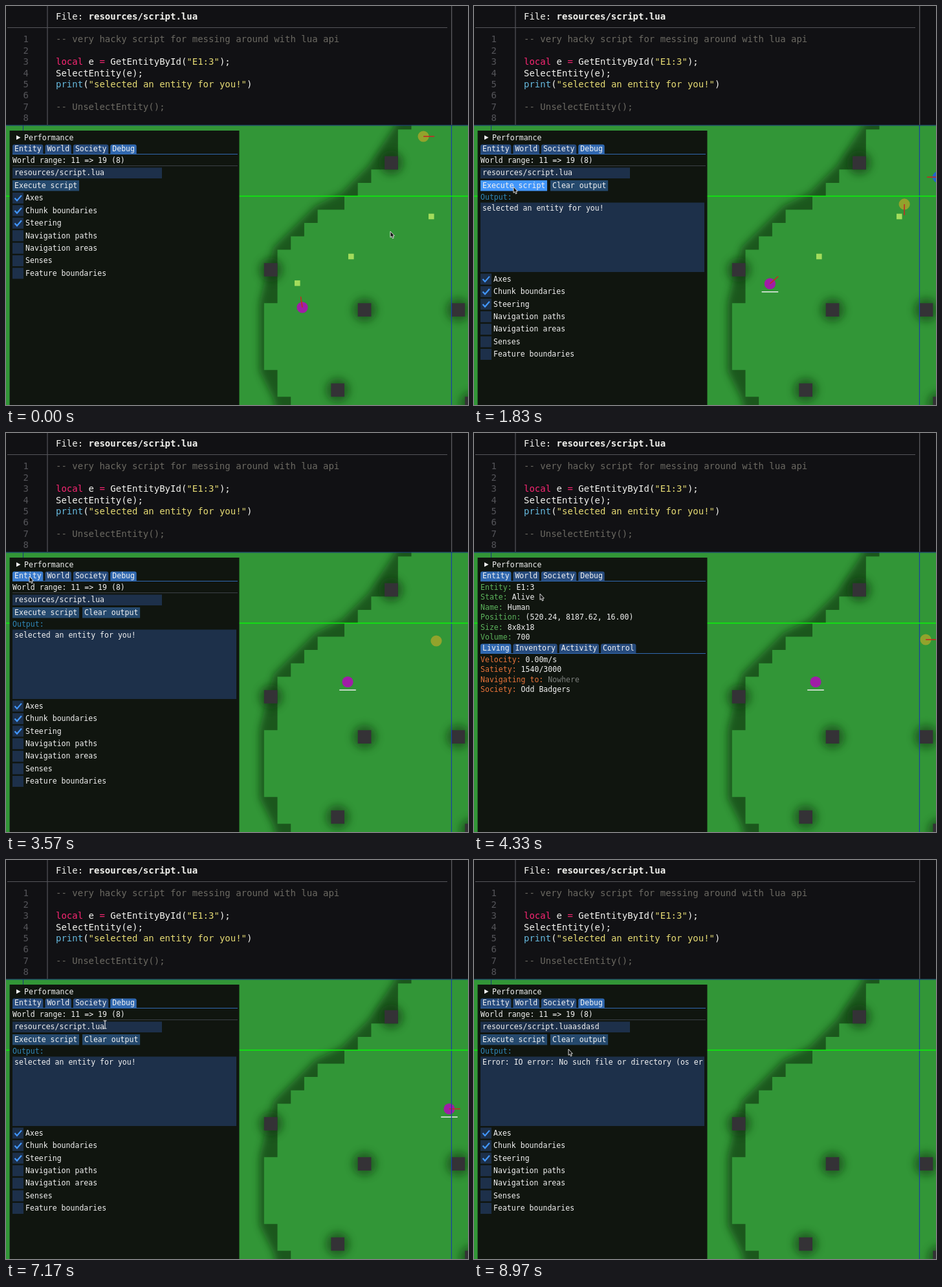
Write an HTML page that moves like this. It is 714x618 px and loops after 9010 ms.

```html
<!DOCTYPE html>
<html lang="en">
<head>
<meta charset="utf-8">
<title>Lua scripting demo</title>
<style>
  html, body { margin: 0; width: 100%; height: 100%; overflow: hidden; background: #111114; }
  svg { display: block; }
  text { white-space: pre; font-family: "DejaVu Sans Mono", monospace; }
  .code text { font-size: 14px; fill: #f4f4f0; }
  .ui text { font-size: 11.55px; fill: #f2f2f2; }
</style>
</head>
<body>
<svg width="714" height="618" viewBox="0 0 714 618">
  <defs>
    <filter id="soft" x="-60%" y="-60%" width="220%" height="220%"><feGaussianBlur stdDeviation="6"/></filter>
    <clipPath id="map"><rect y="184" width="714" height="434"/></clipPath>
    <clipPath id="outputBox"><rect x="10" y="304" width="345" height="108"/></clipPath>
  </defs>
  <g clip-path="url(#map)">
    <g id="terrain"></g>
    <g id="actors"></g>
    <g id="grid"></g>
  </g>
  <g id="editor" class="code"></g>
  <rect x="5.6" y="193" width="354.9" height="430" fill="#10150f"/>
  <g id="panel" class="ui"></g>
  <g id="pointer"></g>
</svg>
<script>
const LOOP = 9010, CHAR = 6.953, CELL = 20.7;
const EXECUTE = 1600, OPEN_ENTITY = 3600, DEPART = 4732, OPEN_DEBUG = 6220, TYPING = 7600, RERUN = 8430;
const FRAME = '#1d304a', BUTTON = '#25496d', BRIGHT = '#4296fa', ACTIVE = '#3068b0', TAB = '#274b7d';
const GREEN = '#329637', SHADE = '#0c3010';

const put = (id, markup) => { document.getElementById(id).innerHTML = markup; };
const rect = (x, y, w, h, fill, extra = '') =>
  `<rect x="${x}" y="${y}" width="${w}" height="${h}" fill="${fill}" ${extra}/>`;
const line = (x1, y1, x2, y2, color, width = 1) =>
  `<path d="M${x1} ${y1}L${x2} ${y2}" stroke="${color}" stroke-width="${width}"/>`;
const span = (color, s, extra = '') => `<tspan fill="${color}" ${extra}>${s}</tspan>`;
const text = (x, y, s, extra = '') => `<text x="${x}" y="${y}" ${extra}>${s}</text>`;

const cellX = c => 398.8 + c * CELL;
const cellY = r => 191.2 + r * CELL;

// [row, column]: from this row down, the land starts at this column
const shore = [[0, 10], [3, 8], [4, 7], [5, 6], [6, 4], [7, 3], [8, 2], [9, 1], [13, 0], [18, 1], [20, 2]];
const blocks = [[9, 2], [0, 10], [7, 13], [14, 13], [5, 19], [15, 20]];

function drawTerrain() {
  const steps = [[11, -3]], corners = [[11, -3]];
  let column = 11;
  for (const [row, next] of shore) {
    steps.push([column, row], [next, row]);
    corners.push([Math.min(column, next), row]);
    column = next;
  }
  const outline = points => 'M' + [...points, [2, 24], [20, 24], [20, -3]]
    .map(([c, r]) => `${cellX(c)} ${cellY(r)}`).join('L') + 'Z';
  const shadows = blocks.map(([c, r]) =>
    `<circle cx="${cellX(c + .5)}" cy="${cellY(r + .5)}" r="19" fill="${SHADE}" opacity=".5" filter="url(#soft)"/>`);
  const solids = blocks.map(([c, r]) => rect(cellX(c), cellY(r), CELL, CELL, '#343236'));
  put('terrain', rect(0, 184, 714, 434, GREEN) +
    `<path d="${outline(corners)}" fill="${SHADE}" stroke="${SHADE}" stroke-width="14" stroke-linejoin="round" opacity=".62" filter="url(#soft)"/>` +
    `<path d="${outline(steps)}" fill="${GREEN}"/>` + shadows.join('') + solids.join(''));
  put('grid', line(0, 184.8, 714, 184.8, '#1a3a78', 1.2) + line(26.5, 185, 26.5, 193, '#1a3a78') +
    line(688.5, 185, 688.5, 618, '#1742a4', 1.2) + line(0, 294.6, 714, 294.6, '#08f408', 1.5));
}

function drawEditor() {
  const pink = '#f92672', gold = '#e6db74', dim = '#6b6962';
  const source = [
    span(dim, '-- very hacky script for messing around with lua api'), '',
    `${span(pink, 'local')} e ${span(pink, '=')} GetEntityById(${span(gold, '"E1:3"')});`,
    'SelectEntity(e);',
    `${span('#66b9de', 'print')}(${span(gold, '"selected an entity for you!"')})`, '',
    span(dim, '-- UnselectEntity();'), ''];
  const rows = source.map((s, i) => {
    const y = Math.round(56.2 + i * 17.45);
    return text(26.5, y, span('#55555a', i + 1)) + text(77, y, s);
  });
  put('editor', rect(0, 0, 714, 184.2, '#111114') +
    line(64, 0, 64, 184, '#55555a', 1.2) + line(2, 33.5, 682, 33.5, '#55555a', 1.2) +
    line(688.7, 0, 688.7, 184, '#626266', 1.2) +
    text(77, 21, 'File: ' + span('#f4f4f0', 'resources/script.lua', 'font-weight="bold"')) + rows.join(''));
}

// Walkers follow each leg at constant speed, then wait for the next one
const human = { color: '#a01ea6', speed: .0644, legs: [
  { start: 0, path: [[458, 467], [453, 434]] },
  { start: 1740, path: [[453, 434], [461, 427], [472, 390], [492, 383], [528, 385.5]] },
  { start: DEPART, path: [[528, 385.5], [732, 385.5]] }] };
const yellow = { color: '#92a32c', speed: .0688, legs: [
  { start: 0, path: [[645, 202], [666, 202], [665, 322]] },
  { start: 3850, path: [[665, 320], [735, 320]] }] };
const blue = { color: '#2464c8', speed: .0644, legs: [{ start: 1600, path: [[732, 265], [717, 265], [732, 265]] }] };
const food = [{ x: 450.3, y: 429.3, eaten: 480 }, { x: 533.3, y: 388, eaten: 3380 }, { x: 657.3, y: 326, eaten: 2060 }];

function locate({ speed, legs }, t) {
  const { start, path } = legs.filter(leg => leg.start <= t).pop() || legs[0];
  let left = Math.max(0, t - start) * speed;
  for (let i = 1; i < path.length; i++) {
    const [x, y] = path[i - 1], dx = path[i][0] - x, dy = path[i][1] - y;
    const length = Math.hypot(dx, dy);
    if (left < length) {
      const ux = dx / length, uy = dy / length;
      return { x: x + ux * left, y: y + uy * left, ux, uy, moving: true };
    }
    left -= length;
  }
  const [x, y] = path[path.length - 1];
  return { x, y, moving: false };
}

function drawWalker(walker, t) {
  const p = locate(walker, t);
  return `<circle cx="${p.x}" cy="${p.y}" r="8.6" fill="${walker.color}"/>` +
    (p.moving ? line(p.x, p.y, p.x + p.ux * 17, p.y + p.uy * 17, '#c42a24', 1.6) : '');
}

function drawActors(t, me) {
  const snacks = food.filter(f => t < f.eaten).map(f => rect(f.x - 4.3, f.y - 4.3, 8.6, 8.6, '#a3dc5c'));
  put('actors', snacks.join('') + [yellow, blue, human].map(w => drawWalker(w, t)).join('') +
    (t >= EXECUTE ? line(me.x - 12.8, me.y + 12.6, me.x + 12.8, me.y + 12.6, '#f0f0f0', 1.5) : ''));
}

// The pointer glides to reach each stop at its time
const stops = [[0, 594, 349], [1150, 61, 280], [2600, 477, 367], [3450, 36, 222], [4250, 102, 249],
  [6080, 167, 226], [6900, 153, 255], [8350, 75, 278], [8900, 146, 293]];
const GLIDE = 500;

function locatePointer(t) {
  let [, x, y] = stops[0];
  for (const [arrive, toX, toY] of stops) {
    const k = Math.min(1, Math.max(0, 1 + (t - arrive) / GLIDE));
    const e = k * k * (3 - 2 * k);
    x += (toX - x) * e;
    y += (toY - y) * e;
  }
  return { x, y };
}

function tabs(names, y, active, hovered) {
  let x = 10, out = '';
  for (const name of names) {
    const w = name.length * CHAR + 5.7;
    const color = name === hovered ? '#3a7bcd' : name === active ? ACTIVE : TAB;
    out += `<path d="M${x} ${y + 15.5}v-12q0-3 3-3h${w - 6}q3 0 3 3v12z" fill="${color}"/>` + text(x + 3, y + 11.3, name);
    x += w + 3;
  }
  return out + line(10, y + 15.5, 358, y + 15.5, ACTIVE);
}

const button = (x, label, hot) =>
  rect(x, 270, label.length * CHAR + 5.7, 16.5, hot ? BRIGHT : BUTTON) + text(x + 3, 282, label);

const fields = (y, color, rows) => rows.map(([label, value], i) =>
  text(10, y + i * 15.55, span(color, label + ':') + ' ' + value)).join('');

function debugTab(t, p) {
  const typed = 'asdasd'.slice(0, Math.max(0, Math.floor((t - TYPING) / 75)));
  const path = 'resources/script.lua' + typed;
  const hasOutput = t >= EXECUTE;
  const hover = p.y > 270 && p.y < 287;
  const message = t < RERUN ? 'selected an entity for you!' : 'Error: IO error: No such file or directory (os error 2)';
  const options = ['Axes', 'Chunk boundaries', 'Steering', 'Navigation paths', 'Navigation areas', 'Senses', 'Feature boundaries'];
  const top = hasOutput ? 414.5 : 289;
  let out = text(10, 242.5, 'World range: 11 =&gt; 19 (8)') + line(10, 247.5, 358, 247.5, '#3b4046') +
    rect(10, 250.3, 231, 16.7, FRAME) + text(13, 262.3, path) +
    button(10, 'Execute script', hover && p.x > 10 && p.x < 113);
  if (t > TYPING - 200 && t < 8250) {
    const x = 13.5 + path.length * CHAR;
    out += line(x, 252.5, x, 265, '#e8e8e8');
  }
  if (hasOutput) out += button(118, 'Clear output', hover && p.x > 118 && p.x < 207) +
    text(10, 299.6, span('#2f86b8', 'Output:')) + rect(10, 304.5, 346, 107.5, FRAME) +
    text(13, 317, message, 'clip-path="url(#outputBox)"');
  return out + options.map((label, i) => {
    const y = top + i * 19.42;
    return rect(10, y, 17, 17, FRAME) + text(30, y + 12.3, label) +
      (i < 3 ? `<path d="M13.5 ${y + 8.6}l3.5 3.8l7-8" fill="none" stroke="${BRIGHT}" stroke-width="2.2"/>` : '');
  }).join('');
}

function entityTab(t, me) {
  const moving = t >= DEPART;
  const x = (520.24 + (me.x - 528) / 20.4).toFixed(2);
  return fields(242.6, '#5cb35c', [['Entity', 'E1:3'], ['State', 'Alive'], ['Name', 'Human'],
    ['Position', `(${x}, 8187.62, 16.00)`], ['Size', '8x8x18'], ['Volume', '700']]) +
    tabs(['Living', 'Inventory', 'Activity', 'Control'], 326, 'Living') +
    fields(354.6, '#e8743a', [['Velocity', moving ? '0.16m/s' : '0.00m/s'],
      ['Satiety', `${1540 - Math.floor((t - 4330) / 150)}/3000`],
      ['Navigating to', moving ? '(533.50, 8181.50, 16.00)' : span('#7c7f7c', 'Nowhere')],
      ['Society', 'Odd Badgers']]);
}

function drawPanel(t, p, me) {
  const onEntity = t >= OPEN_ENTITY && t < OPEN_DEBUG;
  const overTabs = p.y > 213 && p.y < 229;
  const hovered = overTabs && (p.x > 161 && p.x < 202 ? 'Debug' : p.x > 10 && p.x < 57 ? 'Entity' : '');
  put('panel', '<path d="M16 200.2l6.5 3.5l-6.5 3.5z" fill="#f2f2f2"/>' + text(28, 207.6, 'Performance') +
    tabs(['Entity', 'World', 'Society', 'Debug'], 214, onEntity ? 'Entity' : 'Debug', hovered) +
    (onEntity ? entityTab(t, me) : debugTab(t, p)));
}

function drawPointer(p) {
  const overInput = p.x > 10 && p.x < 241 && p.y > 250 && p.y < 267;
  const shape = overInput
    ? 'M-2.5 -6h2l.5 .8l.5-.8h2M0 -5.2v10.4M-2.5 6h2l.5-.8l.5 .8h2'
    : 'M0 0V9.4L2 7.6L3.5 11L5.2 10.2L3.8 7H6.4Z';
  put('pointer', `<path d="${shape}" transform="translate(${p.x} ${p.y})" fill="${overInput ? 'none' : '#101010'}" stroke="#eee" stroke-width="${overInput ? 1.1 : 0.9}"/>`);
}

function render(now) {
  const t = now % LOOP;
  const me = locate(human, t);
  const p = locatePointer(t);
  drawActors(t, me);
  drawPanel(t, p, me);
  drawPointer(p);
}

drawTerrain();
drawEditor();
const start = performance.now();
function tick() {
  render(performance.now() - start);
  requestAnimationFrame(tick);
}
tick();
</script>
</body>
</html>
```
